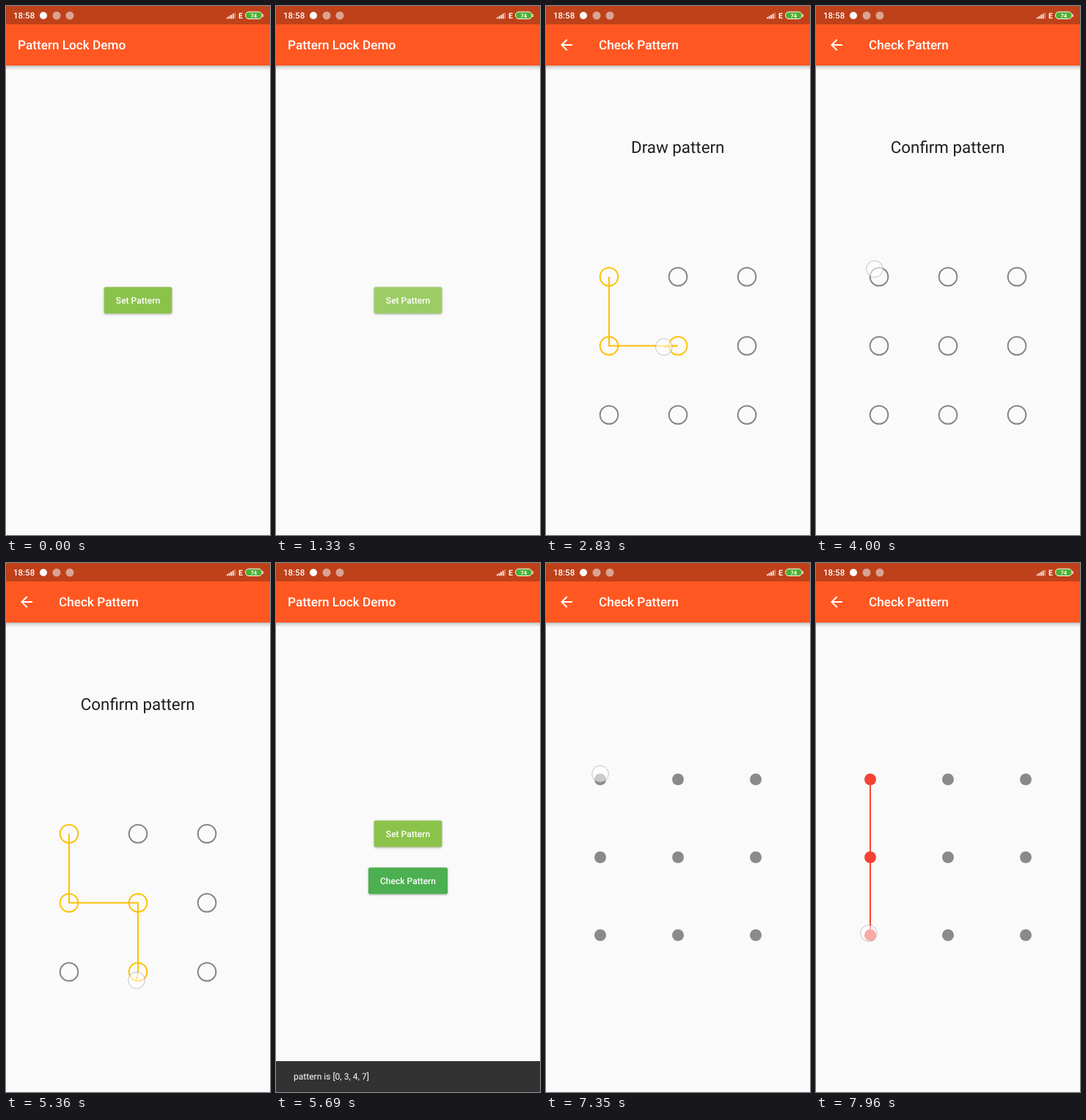
Recreate the animation shown at these times as an HTML page. Size 360 by 720 pixels, loop 8 s.

```html
<!DOCTYPE html>
<html lang="en">
<head>
<meta charset="utf-8">
<title>Pattern lock</title>
<style>
  html, body { margin: 0; width: 100%; height: 100%; overflow: hidden; background: #fafafa; }
  svg { display: block; }
  #stage { width: 100%; height: 100%; }
  text { font-family: Roboto, sans-serif; fill: #fff; text-rendering: geometricPrecision; }
  .title { font-size: 17.2px; font-weight: 500; }
  .label { font-size: 12.04px; font-weight: 500; text-anchor: middle; }
  .prompt { font-size: 22.36px; fill: #1f1f1f; text-anchor: middle; }
  .raised { filter: drop-shadow(0 1.5px 1.5px rgba(0, 0, 0, .3)); }
</style>
</head>
<body>
<svg id="stage" viewBox="0 0 360 720">
  <defs>
    <linearGradient id="shade" x2="0" y2="1">
      <stop stop-opacity=".24"/>
      <stop offset=".5" stop-opacity=".08"/>
      <stop offset="1" stop-opacity="0"/>
    </linearGradient>
    <g id="scaffold">
      <rect width="360" height="720" fill="#fafafa"/>
      <rect y="81" width="360" height="7" fill="url(#shade)"/>
      <rect width="360" height="81" fill="#ff5722"/>
    </g>
  </defs>

  <g id="home">
    <use href="#scaffold"/>
    <text class="title" x="16" y="59">Pattern Lock Demo</text>
    <g id="buttons"></g>
    <g id="snack">
      <rect y="678" width="360" height="42" fill="#323232"/>
      <text x="24" y="703" font-size="12.04">pattern is [0, 3, 4, 7]</text>
    </g>
  </g>

  <g id="page">
    <use href="#scaffold"/>
    <path transform="translate(16 41)" fill="#fff" d="M20 11H7.83l5.59-5.59L12 4l-8 8 8 8 1.41-1.41L7.83 13H20z"/>
    <text class="title" x="72" y="59">Check Pattern</text>
    <text class="prompt" id="prompt" x="179.7" y="200"></text>
    <g id="grids"></g>
  </g>

  <g id="status">
    <rect width="360" height="25" fill="#bf411a"/>
    <text x="10" y="17" font-size="11.5" font-weight="500">18:58</text>
    <circle cx="51" cy="13" r="5" fill="#fff"/>
    <circle cx="69" cy="13" r="5.5" fill="#d9a393"/>
    <circle cx="87" cy="13" r="5.5" fill="#d9a393"/>
    <g id="signal"></g>
    <text x="317" y="17" font-size="10.5" font-weight="700">E</text>
    <rect x="326.5" y="8" width="22.5" height="9.5" rx="4.5" fill="#4caf30" stroke="#fff"/>
    <rect x="349.5" y="11" width="1.2" height="4" fill="#fff"/>
    <text x="337.7" y="15.6" font-size="7.5" font-weight="700" text-anchor="middle">74</text>
  </g>

  <circle id="touch" r="11.3" fill="#fff" fill-opacity=".55" stroke="#9090a8" stroke-opacity=".55"/>
</svg>

<script>
const LOOP = 8000, PUSH_SET = 1330, CONFIRM = 3510, POP = 5400, PUSH_CHECK = 6595, SLIDE = 300;
const $ = id => document.getElementById(id);
const clamp = v => Math.min(1, Math.max(0, v));

function add(parent, tag, attrs = {}) {
  const node = document.createElementNS('http://www.w3.org/2000/svg', tag);
  set(node, attrs);
  return parent.appendChild(node);
}
function set(node, attrs) {
  for (const key in attrs) node.setAttribute(key, attrs[key]);
}
function show(node, visible) {
  node.style.display = visible ? '' : 'none';
}

function bezier(x1, y1, x2, y2) {
  const at = (s, a, b) => 3 * s * (1 - s) ** 2 * a + 3 * s * s * (1 - s) * b + s ** 3;
  return x => {
    if (x <= 0 || x >= 1) return clamp(x);
    let low = 0, high = 1;
    for (let i = 0; i < 24; i++) {
      const mid = (low + high) / 2;
      if (at(mid, x1, x2) < x) low = mid; else high = mid;
    }
    return at(low, y1, y2);
  };
}
const fastOutSlowIn = bezier(.4, 0, .2, 1);
const easeIn = bezier(.42, 0, 1, 1);

function makeButton(label, width, color) {
  const group = add($('buttons'), 'g');
  const left = 180 - width / 2;
  add(group, 'rect', { class: 'raised', x: left, y: -18, width, height: 36, rx: 2, fill: color });
  const clip = add(group, 'svg', { x: left, y: -18, width, height: 36, overflow: 'hidden' });
  const ripple = add(clip, 'circle', { cy: 19, fill: '#fff' });
  add(group, 'text', { class: 'label', x: 180, y: 4.3 }).textContent = label;
  return { group, ripple, left };
}

// Filled dots lie above the trace, hollow rings below it.
function makeGrid(pitch, centerY, style) {
  const group = add($('grids'), 'g');
  const points = [], dots = [];
  for (let i = 0; i < 9; i++) {
    points.push([180 + (i % 3 - 1) * pitch, centerY + (Math.floor(i / 3) - 1) * pitch]);
    dots.push(add(group, 'circle', { cx: points[i][0], cy: points[i][1], r: style.r, 'stroke-width': 2 }));
  }
  const line = add(group, 'polyline', { fill: 'none', stroke: style.active, 'stroke-width': 2 });
  if (style.filled) group.prepend(line);
  return { group, line, points, dots, style };
}

const setButton = makeButton('Set Pattern', 92.5, '#8bc34a');
const checkButton = makeButton('Check Pattern', 108, '#4caf50');
const ringGrid = makeGrid(94, 462.5, { r: 12.3, idle: '#858585', active: '#ffc107' });
const dotGrid = makeGrid(106, 400.5, { r: 8, idle: '#8a8a8a', active: '#f44336', filled: true });

for (let i = 0; i < 5; i++) {
  const height = 2 + i * 1.6;
  add($('signal'), 'rect', {
    x: 301 + i * 2.6, y: 17.3 - height, width: 1.7, height, fill: '#fff', opacity: i < 4 ? 1 : .4
  });
}

// Finger paths as [time, x, y]; hits are the times at which each node is caught.
const gestures = [
  { grid: ringGrid, nodes: [0, 3, 4, 7], hits: [2170, 2560, 2830, 3230], end: CONFIRM,
    path: [[2110, 82, 361], [2250, 84, 370], [2590, 86, 464], [2890, 179, 464], [2930, 180, 466], [3360, 179, 567], [3510, 178, 567]] },
  { grid: ringGrid, nodes: [0, 3, 4, 7], hits: [4105, 4370, 4550, 4740], end: POP,
    path: [[4000, 80, 358], [4100, 80, 358], [4390, 86, 464], [4580, 179, 464], [4770, 180, 566], [5360, 178, 568]] },
  { grid: dotGrid, nodes: [0, 3, 6], hits: [7400, 7680, 7930], end: LOOP,
    path: [[7350, 74, 287], [7430, 73, 294], [7700, 72, 400], [7960, 72, 504]] }
];
const taps = [
  { button: setButton, start: 1140, end: 1250, x: 176, y: 401.5 },
  { button: checkButton, start: 6470, end: 6570, x: 167, y: 433.5 }
];

function fingerAt(path, t) {
  const next = path.findIndex(key => key[0] > t);
  if (next < 0) return path[path.length - 1].slice(1);
  const [t0, x0, y0] = path[next - 1], [t1, x1, y1] = path[next];
  const k = (t - t0) / (t1 - t0);
  return [x0 + (x1 - x0) * k, y0 + (y1 - y0) * k];
}

function drawGrid(grid, gesture, finger, t) {
  const caught = gesture ? gesture.nodes.filter((_, i) => t >= gesture.hits[i]) : [];
  grid.dots.forEach((dot, i) => {
    const color = caught.includes(i) ? grid.style.active : grid.style.idle;
    set(dot, grid.style.filled ? { fill: color } : { fill: 'none', stroke: color });
  });
  const points = caught.map(i => grid.points[i]);
  if (points.length) points.push(finger);
  set(grid.line, { points: points.join(' ') });
}

function drawHome(t) {
  const saved = t >= POP;
  set(setButton.group, { transform: `translate(0 ${saved ? 368.5 : 400.5})` });
  set(checkButton.group, { transform: 'translate(0 432.5)' });
  show(checkButton.group, saved);
  show($('snack'), saved);
  set($('snack'), { transform: `translate(0 ${42 * (1 - fastOutSlowIn(clamp((t - POP - 10) / 250)))})` });
  for (const { button, start, x } of taps) {
    const age = t - start;
    const opacity = age < 0 ? 0 : .15 * clamp(age / 75) * (1 - clamp((age - 200) / 200));
    set(button.ripple, { cx: x - button.left, r: 10 + 60 * clamp(age / 200), opacity });
  }
}

function drawPage(t) {
  const checking = t >= PUSH_CHECK;
  const shown = checking ? clamp((t - PUSH_CHECK) / SLIDE)
    : t < POP ? clamp((t - PUSH_SET) / SLIDE) : 1 - clamp((t - POP) / SLIDE);
  show($('page'), shown > 0);
  set($('page'), { opacity: easeIn(shown), transform: `translate(0 ${180 * (1 - fastOutSlowIn(shown))})` });
  show(ringGrid.group, !checking);
  show(dotGrid.group, checking);
  $('prompt').textContent = checking ? '' : t < CONFIRM ? 'Draw pattern' : 'Confirm pattern';
}

function draw(t) {
  const gesture = gestures.find(g => t >= g.path[0][0] && t < g.end);
  const tap = taps.find(p => t >= p.start && t < p.end);
  const finger = gesture ? fingerAt(gesture.path, t) : tap && [tap.x, tap.y];
  drawHome(t);
  drawPage(t);
  for (const grid of [ringGrid, dotGrid]) {
    drawGrid(grid, gesture && gesture.grid === grid ? gesture : null, finger, t);
  }
  show($('touch'), Boolean(finger));
  if (finger) set($('touch'), { cx: finger[0], cy: finger[1] });
}

const origin = performance.now();
function tick() {
  draw((performance.now() - origin) % LOOP);
  requestAnimationFrame(tick);
}
tick();
</script>
</body>
</html>
```
